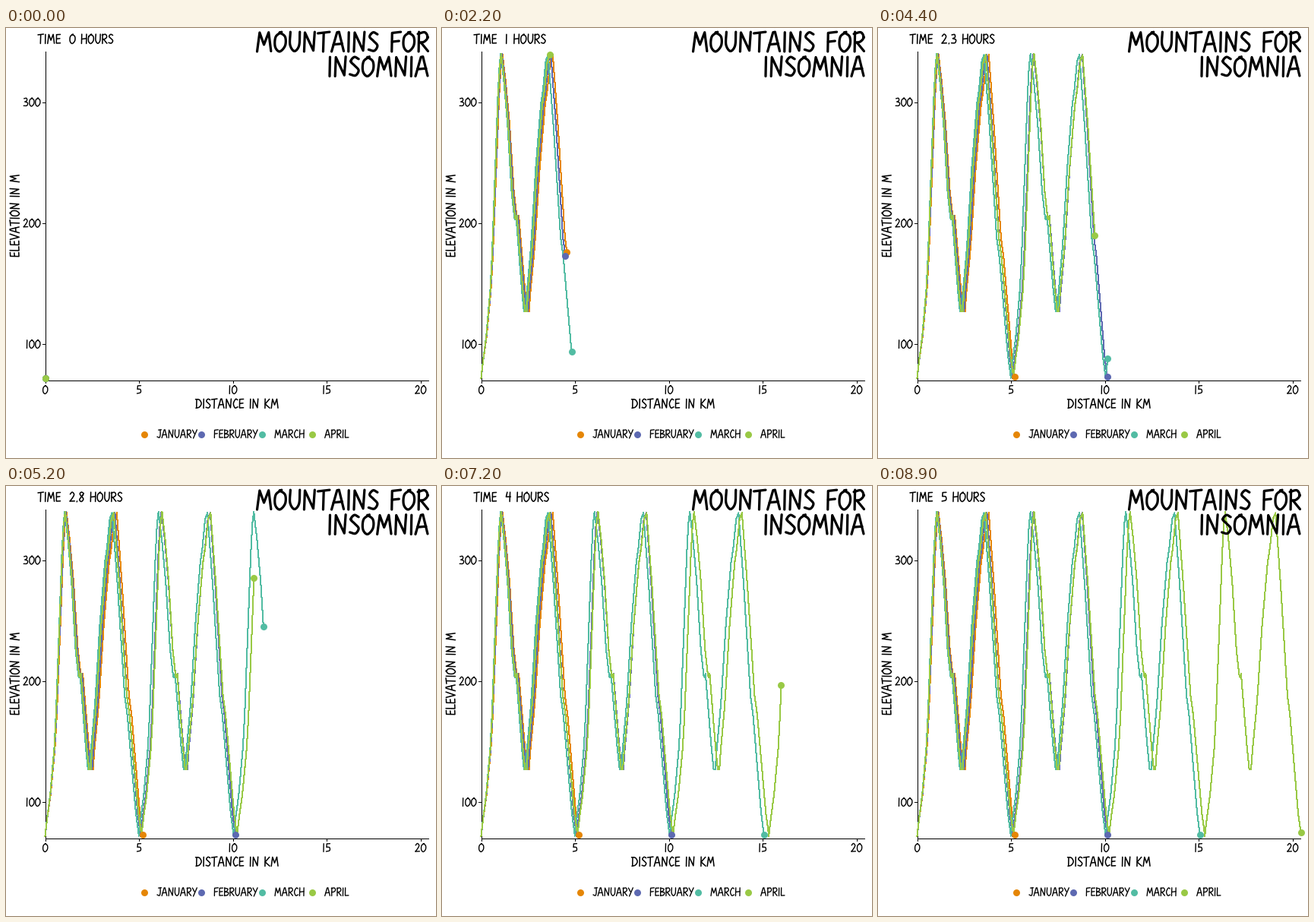
A matplotlib script for the animation above (10000 ms loop, 566x566 px).

```python
import numpy as np
import matplotlib.pyplot as plt
from matplotlib.animation import FuncAnimation
from matplotlib.collections import LineCollection

SIZE = 566
FRAMES, INTERVAL = 100, 100
HOLD, STEPS, HOURS = 5, 84, 5
PT = 0.72  # points per pixel at 100 dpi


# --- hand lettering -------------------------------------------------------
def line(*xy):
    return np.reshape(xy, (-1, 2))


def curve(*xy):
    """Smooth Catmull-Rom stroke through the given points."""
    p = np.reshape(xy, (-1, 2))
    p = np.vstack([2 * p[0] - p[1], p, 2 * p[-1] - p[-2]])
    t = np.linspace(0, 1, 8)[:, None]
    parts = []
    for a, b, c, d in zip(p, p[1:], p[2:], p[3:]):
        parts.append(b + t / 2 * (c - a + t * (2 * a - 5 * b + 4 * c - d
                                               + t * (3 * (b - c) + d - a))))
    return np.vstack(parts)


STRAIGHT = {
    "A": (.78, line(.02, 0, .30, .98, .4, 1, .64, .02), line(.12, .36, .56, .4)),
    "E": (.62, line(.5, .97, .1, .95, .08, .04, .5, .06), line(.1, .5, .45, .54)),
    "F": (.62, line(.54, 1, .1, .95, .08, 0), line(.1, .5, .45, .54)),
    "H": (.74, line(.1, 1, .07, 0), line(.6, 1, .58, 0), line(.1, .48, .58, .54)),
    "I": (.30, line(.12, .98, .1, 0)),
    "K": (.70, line(.1, 1, .08, 0), line(.55, .97, .1, .45, .58, .02)),
    "L": (.60, line(.1, 1, .08, .04, .5, .06)),
    "M": (.90, line(.05, 0, .18, .97, .4, .35, .64, .98, .76, .02)),
    "N": (.78, line(.08, 0, .12, .97, .55, .05, .62, 1)),
    "T": (.68, line(0, .93, .6, 1), line(.3, .95, .27, 0)),
    "V": (.72, line(.04, .98, .28, .02, .62, 1)),
    "Y": (.70, line(.04, .98, .3, .5), line(.6, 1, .15, -.05)),
    " ": (.50,),
}
stem = line(.1, 1, .08, 0)
bowl = curve(.04, .9, .4, .98, .54, .72, .36, .5, .1, .46)
oval = curve(.4, 1, .1, .75, .07, .25, .3, 0, .58, .3, .58, .75, .3, .98)
ROUND = {
    "B": (.68, stem, curve(.08, .96, .48, .85, .38, .6, .12, .5),
          curve(.12, .5, .55, .4, .45, .1, .06, .02)),
    "C": (.65, curve(.52, .88, .32, .97, .08, .5, .25, .04, .54, .14)),
    "D": (.75, line(.12, .95, .1, .02),
          curve(0, .95, .4, .9, .62, .5, .4, .12, .04, .02)),
    "J": (.60, line(.2, .97, .56, 1), curve(.42, .98, .43, .4, .32, .04, .04, .14)),
    "O": (.75, oval),
    "P": (.68, stem, bowl),
    "R": (.68, stem, bowl, line(.2, .46, .56, .02)),
    "S": (.65, curve(.5, .88, .28, .98, .1, .76, .3, .54, .5, .3, .34, .04, .05, .1)),
    "U": (.72, curve(.1, 1, .08, .35, .3, .02, .54, .3, .58, 1)),
}
DIGITS = {
    "0": (.72, oval),
    "1": (.35, line(.12, .98, .1, 0)),
    "2": (.70, curve(.08, .78, .3, 1, .5, .75, .3, .35, .06, .04),
          line(.06, .04, .56, .06)),
    "3": (.70, curve(.1, .92, .4, .96, .45, .68, .22, .54),
          curve(.22, .54, .54, .4, .45, .08, .06, .06)),
    "4": (.68, line(.2, 1, .08, .5, .56, .52), line(.5, 1, .46, 0)),
    "5": (.68, line(.52, .98, .14, .96, .12, .56),
          curve(.12, .56, .46, .52, .48, .16, .06, .04)),
    "6": (.68, curve(.42, 1, .12, .5, .2, .04, .5, .2, .4, .48, .1, .36)),
    "7": (.66, line(.06, .95, .54, .97, .2, 0)),
    "8": (.68, curve(.5, .88, .28, 1, .12, .78, .48, .3, .28, 0, .08, .22,
                     .44, .7, .5, .88)),
    "9": (.68, curve(.5, .85, .2, .95, .1, .62, .34, .5, .5, .85),
          line(.5, .88, .42, 0)),
    ".": (.30, line(.12, .05, .09, -.03)),
    ":": (.34, line(.12, .2, .12, .17), line(.13, .68, .13, .65)),
}
GLYPHS = {**STRAIGHT, **ROUND, **DIGITS}


def strokes(text, x, y, cap, align=0.0, upright=False):
    """Pixel strokes for text; align is 0 left, 0.5 centre, 1 right."""
    width = sum(GLYPHS[c][0] for c in text) - .1
    pen, result = -align * width, []
    for c in text:
        advance, *parts = GLYPHS[c]
        for p in parts:
            u, v = (p[:, 0] + pen) * cap, p[:, 1] * cap
            dx, dy = (-v, -u) if upright else (u, -v)
            result.append(np.column_stack([x + dx, y + dy]))
        pen += advance
    return result


# --- course and runners ---------------------------------------------------
# Elevation over one lap; whole numbers are start, peak, dip, peak, finish.
PROFILE = line(0, 72, .11, 88, .25, 105, .46, 144, .55, 172, .7, 238, .85, 305,
               .93, 330, 1, 340, 1.13, 317, 1.28, 282, 1.45, 226, 1.57, 204,
               1.61, 203, 1.64, 206, 1.67, 198, 1.78, 170, 1.88, 145, 1.97, 127,
               2.04, 127, 2.1, 144, 2.24, 174, 2.3, 190, 2.47, 245, 2.69, 298,
               2.78, 310, 2.9, 334, 3, 339, 3.2, 280, 3.47, 188, 3.57, 172,
               3.89, 91, 4, 73)


class Runner:
    def __init__(self, name, color, legend_x, marks, progress):
        self.name, self.color, self.legend_x = name, color, legend_x
        marks = np.array([0, *marks])
        lap = PROFILE[:, 0]
        self.km = np.concatenate([np.interp(lap, range(5), marks[i:i + 5])
                                  for i in range(0, len(marks) - 1, 4)])
        self.m = np.tile(PROFILE[:, 1], len(marks) // 4)
        self.steps, self.done = np.reshape(progress, (-1, 2)).T

    def trail(self, step):
        pos = np.interp(step, self.steps, self.done)
        passed = self.km < pos
        km = np.append(self.km[passed], pos)
        m = np.append(self.m[passed], np.interp(pos, self.km, self.m))
        return to_x(km), to_y(m)


def to_x(km):
    return 51.5 + 24.7 * np.asarray(km)


def to_y(m):
    return 416 - 1.5925 * (np.asarray(m) - 100)


RUNNERS = [
    Runner("JANUARY", "#E58606", 181.5, [1.13, 2.5, 3.82, 5.2],
           [0, 0, 11, 2.9, 17, 4.57, 20, 5.2]),
    Runner("FEBRUARY", "#5D69B1", 256.5,
           [1.1, 2.45, 3.72, 5.08, 6.2, 7.53, 8.8, 10.13],
           [0, 0, 17, 4.49, 22, 5.5, 29, 7.37, 33, 8.2, 39, 10.13]),
    Runner("MARCH", "#52BCA3", 336.5,
           [1.05, 2.32, 3.57, 4.99, 6.04, 7.42, 8.65, 10.04,
            11.12, 12.43, 13.72, 15.07],
           [0, 0, 11, 4.15, 17, 4.82, 22, 5.77, 29, 7.33, 33, 8.24, 39, 10.16,
            44, 10.91, 54, 13.32, 55, 13.58, 61, 15.07]),
    Runner("APRIL", "#99C945", 402.5,
           [1.07, 2.38, 3.66, 5.13, 6.23, 7.5, 8.82, 10.22,
            11.35, 12.65, 13.9, 15.33, 16.42, 17.74, 19.1, 20.45],
           [0, 0, 17, 3.66, 22, 5.4, 29, 6.8, 39, 9.47, 44, 10.42, 54, 12.79,
            66, 15.9, 67, 15.99, 77, 18.16, 84, 20.45]),
]
RUNNERS[-1].m[-1] = 75

# --- stage ----------------------------------------------------------------
fig = plt.figure(figsize=(SIZE / 100, SIZE / 100), dpi=100, facecolor="white")
ax = fig.add_axes([0, 0, 1, 1])
ax.set(xlim=(0, SIZE), ylim=(SIZE, 0))
ax.axis("off")


def letter(text, x, y, cap, **layout):
    art = LineCollection(strokes(text, x, y, cap, **layout), colors="black",
                         linewidths=.125 * cap * PT, capstyle="round",
                         joinstyle="round", zorder=5)
    return ax.add_collection(art, autolim=False)


def rule(xs, ys):
    ax.plot(xs, ys, color="black", lw=PT, antialiased=False, zorder=1)


def dot(x, y, color):
    return ax.plot([x], [y], "o", ms=9 * PT, mew=0, color=color, zorder=4)[0]


rule([51.5, 51.5], [31, 463.5])
rule([51.5, 556], [463.5, 463.5])
for m in (100, 200, 300):
    rule([47.5, 51.5], [to_y(m)] * 2)
    letter(str(m), 45, to_y(m) + 5.5, 11, align=1)
for km in range(0, 21, 5):
    rule([to_x(km)] * 2, [463.5, 467])
    letter(str(km), to_x(km), 481.5, 11, align=.5)

letter("MOUNTAINS FOR", 556, 31, 25.8, align=1)
letter("INSOMNIA", 556, 63.5, 25.8, align=1)
letter("DISTANCE IN KM", 304, 500.5, 12.4, align=.5)
letter("ELEVATION IN M", 17.5, 247.5, 12.4, align=.5, upright=True)
clock = letter("TIME: 0 HOURS", 42, 20.5, 12.4)

trails, dots = [], []
for r in RUNNERS:
    dot(r.legend_x, 534.5, r.color)
    letter(r.name, r.legend_x + 17, 539.5, 10.7)
    trails += ax.plot([], [], color=r.color, lw=PT, antialiased=False, zorder=3)
    dots.append(dot(51.5, 459, r.color))


def update(frame):
    step = min(max(frame - HOLD, 0), STEPS)
    hours = round(HOURS * step / STEPS, 1)
    clock.set_segments(strokes(f"TIME: {hours:g} HOURS", 42, 20.5, 12.4))
    for r, trail, head in zip(RUNNERS, trails, dots):
        x, y = r.trail(step)
        trail.set_data(x, y)
        head.set_data(x[-1:], y[-1:])
    return [clock, *trails, *dots]


anim = FuncAnimation(fig, update, frames=FRAMES, interval=INTERVAL,
                     repeat=True, repeat_delay=0)
plt.show()
```
